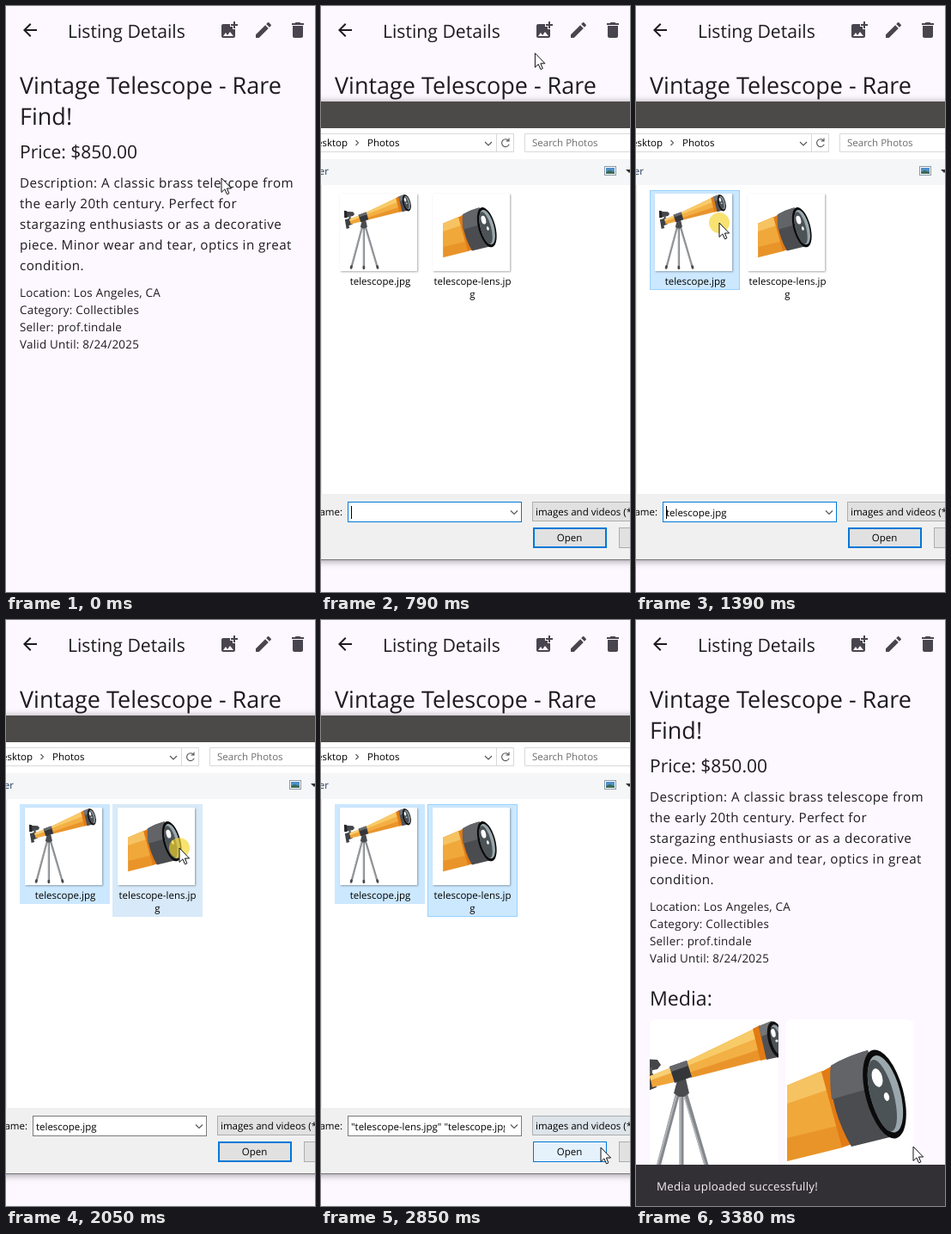
Animation, 360 px wide and 681 px high, one loop 4.61 s. Source, as an HTML page:

```html
<!DOCTYPE html>
<html lang="en">
<head>
<meta charset="utf-8">
<title>Listing Details</title>
<style>
html, body { margin: 0; height: 100%; overflow: hidden; background: #fdf7ff; }
svg { display: block; width: 100vw; height: 100vh; }
text { font-family: "Open Sans", "Noto Sans", sans-serif; fill: #1d1b20; text-rendering: geometricPrecision; white-space: pre; }
.head { font-size: 27px; }
.title { font-size: 21.2px; }
.price { font-size: 21px; }
.body { font-size: 15.2px; letter-spacing: .45px; }
.info { font-size: 13.4px; letter-spacing: .25px; }
.media { font-size: 23.1px; }
.toast { font-size: 13.3px; letter-spacing: .25px; fill: #f5eff7; }
#dialog text { font-size: 11.5px; fill: #000; }
#dialog .mid { text-anchor: middle; }
#dialog .end { text-anchor: end; }
.icon { fill: #49454e; }
.line { fill: none; stroke: #555; stroke-width: 1.1; }
.shadow { filter: drop-shadow(0 1px 4px #0006); }
.thumb { fill: #fff; filter: drop-shadow(1px 1px 1px #0005); }
</style>
</head>
<body>
<svg viewBox="0 0 360 681" preserveAspectRatio="none">
<defs>
  <clipPath id="cropA"><rect x="16" y="464" width="150" height="200" rx="8"/></clipPath>
  <clipPath id="cropB"><rect x="174" y="464" width="150" height="200" rx="8"/></clipPath>
  <clipPath id="cropName"><rect x="32" y="577" width="182" height="21"/></clipPath>

  <g id="scope">
    <g fill="none" stroke-linecap="round">
      <path d="M53 546V656M49 549L21 654M57 549L88 654" stroke="#85888c" stroke-width="5"/>
      <path d="M52 552V650M47 553L21 648M56 553L85 648" stroke="#b7babd" stroke-width="1.5"/>
      <path d="M53 653v4M21 652l-1 4M88 652l1 4" stroke="#47494d" stroke-width="6"/>
    </g>
    <path d="M48 535l10-2 4 17-6 4h-6l-6-4z" fill="#4a4b4f"/>
    <path d="M3 510l22 1 4 6-4 5-22 4z" fill="#45464a"/>
    <path d="M2 508l7 1 1 17-7 1z" fill="#242529"/>
    <path d="M14 520h5v15h-5z" fill="#55575b"/>
    <path d="M4 531l16-4 4 16-10 4 2 6-8 2z" fill="#3f4145"/>
    <path d="M16 530L41 520 45 537 19 543z" fill="#f0a53a"/>
    <path d="M16 530L41 520 42 526 17 535z" fill="#f8cf74"/>
    <path d="M59 513L138 475 147 511 64 532z" fill="#e9942b"/>
    <path d="M59 513L138 475 144 499 62 526z" fill="#f3b044"/>
    <path d="M59 513L138 475 141 486 60 518z" fill="#f8cb69"/>
    <path d="M39 519L59 512 65 531 45 538z" fill="#35363a"/>
    <path d="M39 519L59 512 61 518 41 525z" fill="#66686c"/>
    <path d="M136 475L144 471 153 510 145 512z" fill="#e27b14"/>
    <path d="M143 472L158 466 170 507 152 511z" fill="#505155"/>
    <path d="M143 472L158 466 161 478 146 484z" fill="#737579"/>
    <g transform="translate(164 488) rotate(-15)">
      <ellipse rx="10" ry="22" fill="#111"/>
      <ellipse cx="1" rx="7" ry="18" fill="#8c999e"/>
      <ellipse cx="-1" rx="5.5" ry="16" fill="#4b5256"/>
    </g>
    <ellipse cx="160" cy="480" rx="2.5" ry="5" fill="#fff" transform="rotate(-15 160 480)"/>
    <circle cx="164" cy="489" r="1.6" fill="#fff"/>
  </g>

  <g id="lens">
    <path d="M176 541L217 524 241 613 176 629z" fill="#e99429"/>
    <path d="M176 541L217 524 234 588 176 602z" fill="#f1a83b"/>
    <path d="M176 541L217 524 223 546 176 562z" fill="#f6c363"/>
    <path d="M216 525L227 519 252 609 240 613z" fill="#e27b14"/>
    <path d="M227 518Q245 507 270 500L304 599 251 612Q224 565 227 518z" fill="#4b4c50"/>
    <path d="M227 518Q245 507 270 500L284 541 228 557Q225 536 227 518z" fill="#626468"/>
    <g transform="translate(289.5 551) rotate(-15)">
      <ellipse rx="22" ry="53" fill="#0b0b0c"/>
      <ellipse cx="1" rx="17.5" ry="46" fill="#9aa8ad"/>
      <ellipse cx="-3" cy="1" rx="13.5" ry="43" fill="#4c5357"/>
    </g>
    <ellipse cx="281" cy="532" rx="6" ry="11" fill="#fff" transform="rotate(-15 281 532)"/>
    <ellipse cx="292" cy="554" rx="3" ry="5" fill="#fff" transform="rotate(-15 292 554)"/>
  </g>
</defs>

<rect width="360" height="681" fill="#fdf7ff"/>
<circle id="ink" cx="260" cy="28.5" r="20" fill="#49454e"/>
<g class="icon">
  <path transform="translate(16 16)" fill="#1d1b20" d="M20 11H7.83l5.59-5.59L12 4l-8 8 8 8 1.41-1.41L7.83 13H20z"/>
  <path transform="translate(248 16)" d="M19 7v3h-2V7h-3V5h3V2h2v3h3v2zm-3 4V8h-3V5H5c-1.1 0-2 .9-2 2v12c0 1.1.9 2 2 2h12c1.1 0 2-.9 2-2v-8zM5 19l3-4 2 3 3-4 4 5z"/>
  <path transform="translate(288 16)" d="M3 17.25V21h3.75L17.81 9.94l-3.75-3.75zM20.71 7.04c.39-.39.39-1.02 0-1.41l-2.34-2.34c-.39-.39-1.02-.39-1.41 0l-1.83 1.83 3.75 3.75z"/>
  <path transform="translate(328 16)" d="M6 19c0 1.1.9 2 2 2h8c1.1 0 2-.9 2-2V7H6zM19 4h-3.5l-1-1h-5l-1 1H5v2h14z"/>
</g>
<text class="title" x="72" y="37">Listing Details</text>
<text class="head" x="16" y="102">Vintage Telescope - Rare</text>
<text class="head" x="16" y="138">Find!</text>
<text class="price" x="16" y="177">Price: $850.00</text>
<g id="copy"></g>

<g id="gallery">
  <text class="media" x="16" y="448">Media:</text>
  <g clip-path="url(#cropA)"><rect x="16" y="464" width="150" height="200" fill="#fff"/><use href="#scope"/></g>
  <g clip-path="url(#cropB)"><rect x="174" y="464" width="150" height="200" fill="#fff"/><use href="#lens"/></g>
</g>
<g id="toast">
  <rect width="360" height="60" fill="#322f35"/>
  <text class="toast" x="24" y="30">Media uploaded successfully!</text>
</g>

<g id="dialog">
  <rect class="shadow" x="-20" y="111" width="400" height="533" fill="#f0f0f0"/>
  <rect y="111" width="360" height="31" fill="#4c4a48"/>
  <rect y="142" width="360" height="36" fill="#fff"/>
  <rect y="178" width="360" height="30" fill="#f5f6f7"/>
  <rect y="208" width="360" height="359" fill="#fff"/>
  <path d="M.5 208V567" stroke="#e3e3e3"/>
  <path d="M0 643.5H360" stroke="#77757a"/>
  <path d="M-2 148.5H224.5V169.5H-2M204.5 148.5V169.5M362 148.5H237.5V169.5H362" fill="none" stroke="#d9d9d9"/>
  <path class="line" d="M40.5 156l3 3-3 3M191 158l4 4 4-4M218.6 156.6a4.4 4.4 0 1 0 .6 4M219 153.5v3.5h-3.5"/>
  <text class="end" x="31" y="163">Desktop</text>
  <text x="54" y="163">Photos</text>
  <text x="246" y="163" style="fill:#6d6d6d">Search Photos</text>
  <text class="end" x="9" y="196" style="fill:#1e395b">New folder</text>
  <rect x="330.5" y="186.5" width="13" height="10" fill="#fff" stroke="#8a97a5"/>
  <path d="M332 188h10v5h-10z" fill="#4f8fc8"/>
  <path d="M332 193l4-2 6 2v2h-10z" fill="#3c6a55"/>
  <path d="M355 190h8l-4 4z" fill="#333"/>

  <rect id="itemA" x="16.5" y="214.5" width="104" height="115"/>
  <rect id="itemB" x="124.5" y="214.5" width="104" height="130"/>
  <rect class="thumb" x="22" y="218" width="90" height="90"/>
  <rect class="thumb" x="130" y="218" width="90" height="90"/>
  <use href="#scope" transform="translate(22 218) scale(.45) translate(9 -464)"/>
  <use href="#lens" transform="translate(130 218) scale(.45) translate(-149 -464)"/>
  <text class="mid" x="69" y="324">telescope.jpg</text>
  <text class="mid" x="176.5" y="324">telescope-lens.jp</text>
  <text class="mid" x="176.5" y="339">g</text>

  <text class="end" x="25" y="592">File name:</text>
  <rect id="field" x="31.5" y="576.5" width="202" height="23" fill="#fff"/>
  <g clip-path="url(#cropName)"><text id="name" x="35" y="593"></text></g>
  <path id="caret" d="M35.5 581V596" stroke="#000"/>
  <path class="line" d="M221 586.5l4 4 4-4"/>
  <rect id="filter" x="246.5" y="576.5" width="130" height="22" stroke="#adadad"/>
  <text x="250" y="592">images and videos (*.jpg;*.png)</text>
  <rect id="open" y="0"/>
  <text class="mid" x="289.5" y="622">Open</text>
  <rect x="347.5" y="606.5" width="86" height="23" fill="#e1e1e1" stroke="#adadad"/>
</g>

<circle id="click" r="12" fill="#f5d327" opacity=".65"/>
<path id="cursor" d="M0 0V16.5L3.9 12.9 6.5 18.8 8.9 17.8 6.4 12H11.6z" fill="#fff" stroke="#111"/>
</svg>

<script>
const LOOP = 4610;
const $ = id => document.getElementById(id);
const set = (id, attrs) => { for (const k in attrs) $(id).setAttribute(k, attrs[k]); };
const show = (id, on) => set(id, { visibility: on ? 'visible' : 'hidden' });
const within = (t, a, b) => t >= a && t < b;
const ease = (t, a, b) => {
  const p = Math.min(1, Math.max(0, (t - a) / (b - a)));
  return p * p * (3 - 2 * p);
};

function addLines(cls, y, step, lines) {
  $('copy').innerHTML += lines.map((s, i) =>
    `<text class="${cls}" x="16" y="${y + i * step}">${s}</text>`).join('');
}
addLines('body', 211, 24, [
  'Description: A classic brass telescope from', 'the early 20th century. Perfect for',
  'stargazing enthusiasts or as a decorative', 'piece. Minor wear and tear, optics in great', 'condition.']);
addLines('info', 338, 20, [
  'Location: Los Angeles, CA', 'Category: Collectibles', 'Seller: prof.tindale', 'Valid Until: 8/24/2025']);

// Pointer stops: time, x, y
const path = [
  [40, 251, 200], [500, 265, 30], [730, 265, 30], [990, 153, 208], [1260, 97, 252], [1450, 97, 252],
  [1860, 202, 265], [2220, 202, 265], [2790, 326, 613], [3120, 326, 613], [3260, 323, 612]];

function pointer(t) {
  let [, x, y] = path[0];
  for (let i = 1; i < path.length; i++) {
    const [a, x0, y0] = path[i - 1], [b, x1, y1] = path[i];
    const p = ease(t, a, b);
    x += (x1 - x0) * p;
    y += (y1 - y0) * p;
  }
  return [x, y];
}

function draw(t) {
  const [x, y] = pointer(t);
  const over = (l, top, r, b) => within(x, l, r) && within(y, top, b);
  const at = `translate(${x} ${y})`;
  set('cursor', { transform: at });
  set('click', { transform: at });
  show('click', within(t, 1320, 1455) || within(t, 2050, 2190) || within(t, 2920, 3050));

  const dialog = within(t, 790, 3120);
  show('dialog', dialog);
  set('ink', { opacity: dialog || !over(240, 9, 280, 49) ? 0 : t < 590 ? .08 : .15 });

  const picked = t >= 1320, both = t >= 2120;
  set('itemA', {
    fill: picked ? '#cce8ff' : over(16, 214, 121, 330) ? '#e5f3ff' : 'none',
    stroke: picked ? t < 2050 ? '#99d1ff' : '#cce8ff' : 'none' });
  const fillB = both ? '#cce8ff' : t >= 2050 ? '#d8eaf9' : over(124, 214, 229, 345) ? '#e5f3ff' : 'none';
  set('itemB', { fill: fillB, stroke: both ? '#99d1ff' : fillB });

  $('name').textContent = both ? '"telescope-lens.jpg" "telescope.jpg"' : t >= 1380 ? 'telescope.jpg' : '';
  const focus = t < 1450;
  set('field', { stroke: focus ? '#0078d7' : '#7a7a7a' });
  show('caret', dialog && focus);
  set('filter', { fill: t > 2600 ? '#dde4ea' : '#e1e1e1' });

  const hot = over(247, 606, 333, 630), w = hot ? 1 : 2;
  set('open', {
    x: 247 + w / 2, y: 606 + w / 2, width: 86 - w, height: 24 - w,
    fill: hot ? '#e5f1fb' : '#e1e1e1', stroke: '#0078d7', 'stroke-width': w });

  show('gallery', t >= 3190);
  show('toast', t >= 3190);
  set('toast', { transform: `translate(0 ${681 - 48 * ease(t, 3190, 3370)})` });
}

function tick(now) {
  draw(now % LOOP);
  requestAnimationFrame(tick);
}
draw(0);
requestAnimationFrame(tick);
</script>
</body>
</html>
```
